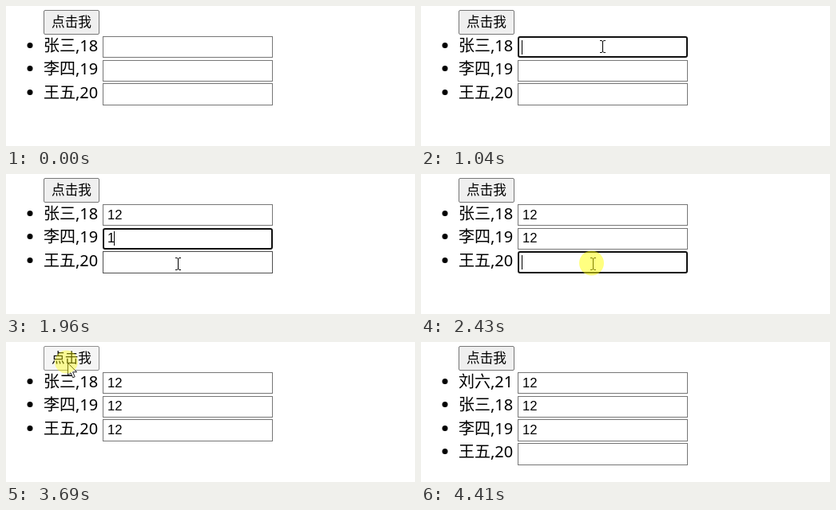
An HTML page that plays this animation: 512 px wide and 176 px high, repeating every 5.02 s.

```html
<!DOCTYPE html>
<html lang="zh">
<head>
<meta charset="utf-8">
<title>List</title>
<style>
  html, body { margin: 0; width: 100%; height: 100%; overflow: hidden; background: #fff; }
  svg { display: block; }
  .name, .label { font: 350 20px "Noto Sans CJK SC", "Noto Sans CJK", sans-serif; }
  .label { font-size: 16.67px; text-anchor: middle; }
  .age { font: 20px "Noto Sans", "Open Sans", sans-serif; }
  .value { font: 16.67px "Liberation Sans", Arial, sans-serif; }
</style>
</head>
<body>
<svg id="stage" width="512" height="176" viewBox="0 0 512 176"></svg>
<script>
const LOOP = 5020, STEP = 66, PRESS = 200, KEY_GAP = 140;
const ROW = 29.7, LEFT = 121, WIDTH = 213;
const people = ['张三,18', '李四,19', '王五,20'];
const added = '刘六,21';

// Pointer stops: arrive, leave, x, y.
const stops = [
  [70, 70, 379, 163], [440, 440, 261, 58], [570, 910, 228, 46],
  [1370, 1760, 222, 84], [1960, 2560, 215, 113], [2890, 3050, 206, 117],
  [3550, 3820, 77, 26], [4080, 4080, 262, 134], [4410, 4410, 450, 175]
];
const clicks = [640, 1630, 2430, 3620];
const typedBy = [1440, 2100, 2890];
const insertAt = clicks[3] + PRESS;

const stage = document.getElementById('stage');

function set(el, attrs) {
  for (const k in attrs) el.setAttribute(k, attrs[k]);
}
function add(tag, attrs, parent = stage) {
  const el = document.createElementNS('http://www.w3.org/2000/svg', tag);
  set(el, attrs);
  return parent.appendChild(el);
}
function show(el, on) {
  el.style.display = on ? '' : 'none';
}

const button = add('rect', { x: 47.5, y: 5.5, width: 69, height: 30, rx: 1.5 });
add('text', { x: 82, y: 26, class: 'label' }).textContent = '点击我';

const rows = [0, 1, 2, 3].map(i => {
  const top = Math.round(38 + ROW * i);
  const height = Math.round(65.45 + ROW * i) - top;
  const base = Math.round(57 + 29.4 * i);
  const g = add('g', {});
  add('circle', { cx: 30, cy: base - 7.5, r: 3.5 }, g);
  return {
    g, top, height,
    name: add('text', { x: 47, y: base, class: 'name' }, g),
    age: add('text', { x: 87, y: base, class: 'age' }, g),
    box: add('rect', { fill: '#fff' }, g),
    value: add('text', { x: 127, y: base, class: 'value' }, g),
    caret: add('rect', { y: base - 14, width: 1, height: 18 }, g)
  };
});

const beam = add('path', {
  d: 'M-3 -7.5H-1L.5 -6.5L2 -7.5H4M.5 -6.5V6.5M-3 7.5H-1L.5 6.5L2 7.5H4',
  fill: 'none', stroke: '#000'
});
const arrow = add('path', {
  d: 'M.5 .5V16L4 12.7L6.7 18.8L9.2 17.7L6.6 11.8H11.6Z',
  fill: '#fff', stroke: '#222'
});
const glow = add('circle', { fill: '#ff0' });

function pointerAt(t) {
  const next = stops.findIndex(s => t < s[0]);
  if (next < 1) return null;
  const [, leave, x, y] = stops[next - 1];
  const [arrive, , x2, y2] = stops[next];
  const moved = Math.max(0, Math.floor((t - leave) / STEP) * STEP);
  const k = moved / (arrive - leave);
  return { x: Math.round(x + (x2 - x) * k), y: Math.round(y + (y2 - y) * k) };
}

function draw(t) {
  const p = pointerAt(t);
  const over = (x, y, w, h) => p && p.x >= x && p.x < x + w && p.y >= y && p.y < y + h;
  const click = clicks.find(c => t >= c && t < c + PRESS);
  const list = t >= insertAt ? [added, ...people] : people;
  let onText = false;

  rows.forEach((r, i) => {
    show(r.g, i < list.length);
    if (i >= list.length) return;
    const focused = t >= clicks[i] && t < clicks[i + 1];
    const typed = t >= typedBy[i] ? 2 : t >= typedBy[i] - KEY_GAP ? 1 : 0;
    const hover = over(LEFT, r.top, WIDTH, r.height);
    onText = onText || hover || over(47, r.top, 68, r.height);
    r.name.textContent = list[i].slice(0, 2);
    r.age.textContent = list[i].slice(2);
    r.value.textContent = '12'.slice(0, typed);
    const line = focused ? 2 : 1;
    set(r.box, {
      x: LEFT + line / 2, y: r.top + line / 2,
      width: WIDTH - line, height: r.height - line,
      rx: focused ? 2 : 0, 'stroke-width': line,
      stroke: focused ? '#101010' : hover ? '#4f4f4f' : '#767676'
    });
    show(r.caret, focused);
    set(r.caret, { x: 126 + 9 * typed });
  });

  const onButton = over(47, 5, 70, 31);
  set(button, {
    fill: !onButton ? '#efefef' : click ? '#f5f5f5' : '#e5e5e5',
    stroke: !onButton ? '#767676' : click ? '#8d8d8d' : '#4f4f4f'
  });

  show(beam, p && onText);
  show(arrow, p && !onText);
  show(glow, p && click);
  if (!p) return;
  for (const el of [beam, arrow]) set(el, { transform: `translate(${p.x} ${p.y})` });
  if (click) {
    const k = (t - click) / PRESS;
    set(glow, { cx: p.x - 1.5, cy: p.y - 1, r: 15.5 - 3 * k, 'fill-opacity': .5 - .3 * k });
  }
}

const began = performance.now();
function tick() {
  draw((performance.now() - began) % LOOP);
  requestAnimationFrame(tick);
}
tick();
</script>
</body>
</html>
```
